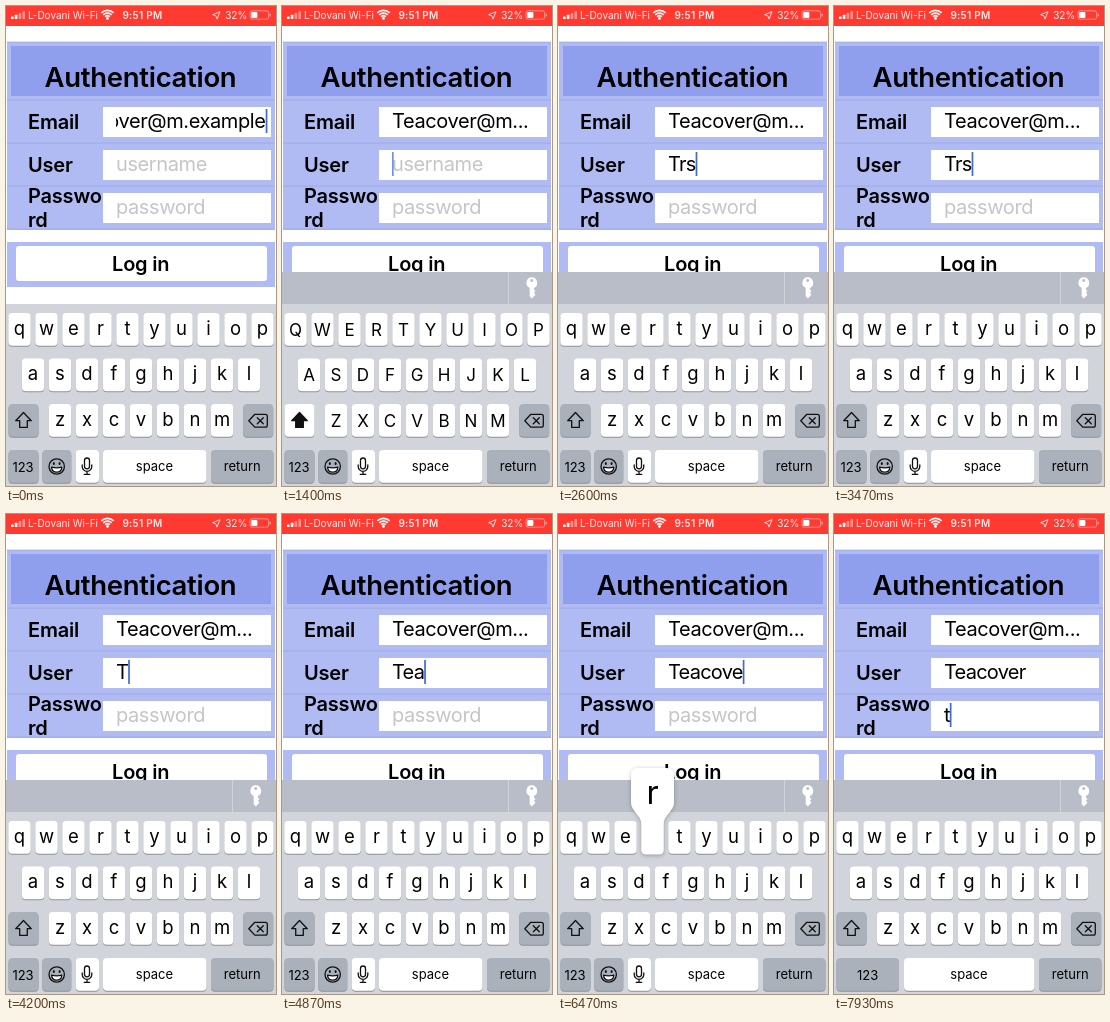
These frames come from a looping animation (270x480 px, 8000 ms). An HTML page:

```html
<!DOCTYPE html>
<html lang="en">
<head>
<meta charset="utf-8">
<title>Login form</title>
<style>
html, body { margin: 0; width: 100%; height: 100%; overflow: hidden; background: #fff; }
svg { display: block; width: 100vw; height: 100vh; font-family: Inter, Roboto, sans-serif; }
.label { font-size: 20px; font-weight: 600; letter-spacing: -.2px; }
.field { font-size: 20px; letter-spacing: -.4px; }
.typed { letter-spacing: -.75px; }
.status { font-size: 10px; fill: #fff; fill-opacity: .9; }
.small { font-size: 13px; text-anchor: middle; }
.mid { text-anchor: middle; }
.line { fill: none; stroke: #111; stroke-width: 1.3; stroke-linejoin: round; stroke-linecap: round; }
</style>
</head>
<body>
<svg id="stage" viewBox="0 0 270 480" preserveAspectRatio="none"></svg>
<script>
const LOOP = 8000;
const NS = 'http://www.w3.org/2000/svg';
const stage = document.getElementById('stage');
const GREY = '#abb1bb';
const EMAIL = 'Teacover@m.example';

function add(tag, attrs, parent = stage, content) {
  const el = document.createElementNS(NS, tag);
  for (const k in attrs) el.setAttribute(k, attrs[k]);
  if (content !== undefined) el.textContent = content;
  parent.appendChild(el);
  return el;
}
const rect = (x, y, width, height, fill, parent, rx = 0) =>
  add('rect', { x, y, width, height, fill, rx }, parent);
const text = (x, y, str, cls, parent, extra = {}) =>
  add('text', { x, y, class: cls, ...extra }, parent, str);
const path = (d, attrs, parent) => add('path', { d, ...attrs }, parent);
const show = (el, on) => el.setAttribute('display', on ? 'inline' : 'none');
const put = (el, str) => { if (el.textContent !== str) el.textContent = str; };

const defs = add('defs', {});
const clip = add('clipPath', { id: 'emailClip' }, defs);
rect(110, 101, 150, 29, '#000', clip);
const blur = add('filter', { id: 'soft', x: '-30%', y: '-30%', width: '160%', height: '160%' }, defs);
add('feDropShadow', { dx: 0, dy: 1, stdDeviation: 2, 'flood-color': '#000', 'flood-opacity': .28 }, blur);

// Status bar
function drawStatus() {
  rect(0, 0, 270, 20, '#ff3a31');
  for (let i = 0; i < 4; i++) {
    const h = 2.5 + i * 1.8;
    add('rect', { x: 5 + i * 3.8, y: 13 - h, width: 2.6, height: h, rx: .6, fill: '#fff', opacity: i < 2 ? 1 : .45 });
  }
  text(22, 12.6, 'L-Dovani Wi-Fi', 'status');
  for (const r of [3.2, 6, 8.8]) {
    const s = r * .7;
    path(`M${101.5 - s} ${13 - s}A${r} ${r} 0 0 1 ${101.5 + s} ${13 - s}`,
      { fill: 'none', stroke: '#fff', 'stroke-width': 1.7 });
  }
  add('circle', { cx: 101.5, cy: 12.4, r: 1.3, fill: '#fff' });
  text(136.5, 12.6, '9:51 PM', 'status mid', stage, { 'font-weight': 600, 'letter-spacing': '.3px' });
  path('M214 5.7l-3 7.4-1.1-3.3-3.3-1.1z', { fill: 'none', stroke: '#fff', 'stroke-width': .8 });
  text(219.2, 12.6, '32%', 'status');
  add('rect', { x: 244, y: 4.8, width: 18.6, height: 8.4, rx: 2, fill: 'none', stroke: '#fff', 'stroke-width': .8, opacity: .55 });
  rect(245.2, 6, 6.2, 6, '#fff', stage, 1);
  add('rect', { x: 263.5, y: 7.5, width: 1.2, height: 3, rx: .6, fill: '#fff', opacity: .55 });
}

// Form
function drawForm() {
  rect(1, 36, 268, 188, '#afbbf2');
  rect(5, 40, 260, 50, '#8f9fee');
  for (const y of [36, 94, 137, 180, 223]) rect(1, y - .3, 268, .7, '#98a3dc');
  text(134.5, 81, 'Authentication', 'mid', stage, { 'font-size': 27.5, 'font-weight': 600, 'letter-spacing': '-.3px' });
  text(22, 122.6, 'Email', 'label');
  text(22, 165.6, 'User', 'label');
  text(22, 196.6, 'Passwo', 'label');
  text(22, 221.4, 'rd', 'label');
  for (const y of [101, 144, 187]) rect(97, y, 168, 30, '#fff');
  rect(1, 236, 268, 45, '#afbbf2');
  rect(10, 240, 251, 35, '#fff', stage, 3);
  text(134.7, 265, 'Log in', 'label mid');
}

drawStatus();
drawForm();
const tail = text(259.5, 121.5, EMAIL, 'field',
  add('g', { 'clip-path': 'url(#emailClip)' }), { 'text-anchor': 'end' });
const cut = text(110, 121.5, EMAIL.slice(0, 10) + '...', 'field');
const user = text(110, 164.5, '', 'field');
const pass = text(110, 207.5, '', 'field');
const caret = rect(0, 0, 1.7, 24, '#3f69d9');

// Keyboard
rect(0, 298, 270, 182, '#d1d4db');
const bar = add('g', {});
rect(0, 266, 270, 32, '#b8bdc7', bar);
rect(226, 266, 1, 32, '#d1d4da', bar);
path('M249.7 271.2a5.6 5.6 0 0 1 2.2 10.7v1.6l1.6 1.6-1.6 1.7 1.6 1.7-3.6 4-2.2-2.2v-8.4a5.6 5.6 0 0 1 2-10.7z'
  + 'M249.7 273a1.5 1.5 0 1 0 .01 0z', { fill: '#fff', 'fill-rule': 'evenodd' }, bar);

function cap(x, y, w, fill = '#fff', parent = stage) {
  rect(x, y + 1, w, 32.8, '#8d9197', parent, 4);
  return rect(x, y, w, 32.8, fill, parent, 4);
}

const rows = [['qwertyuiop', 13.5, 307], ['asdfghjkl', 27, 352.5], ['zxcvbnm', 54, 398]];
const keys = {};
for (const [letters, x0, y] of rows) {
  [...letters].forEach((ch, i) => {
    const x = x0 + 27 * i;
    cap(x - 11.2, y, 22.4);
    keys[ch] = { x, y, glyph: text(x, y, ch, 'mid') };
  });
}

const shiftCap = cap(2.5, 398, 30, GREY);
const shiftIcon = path('M17.5 406.5l7.8 8.2h-4v6.7h-7.6v-6.7h-4z', { class: 'line' });
const delCap = cap(237.2, 398, 30, GREY);
const delIcon = path('M242.8 414.7l6-6.4h10.6q1.9 0 1.9 1.9v9q0 1.9-1.9 1.9h-10.6z', { class: 'line' });
const delCross = path('M251.3 411.7l6 6m0-6l-6 6', { class: 'line' });

const fullRow = add('g', {});
cap(2.5, 444, 30, GREY, fullRow);
text(17, 465.5, '123', 'small', fullRow);
cap(36.3, 444, 29, GREY, fullRow);
add('circle', { cx: 50.7, cy: 460.5, r: 7.7, class: 'line' }, fullRow);
for (const x of [47.8, 53.6]) add('ellipse', { cx: x, cy: 457.6, rx: 1, ry: 1.5, fill: '#111' }, fullRow);
path('M45.6 461.2q5.1 1.4 10.2 0c-.6 6.6-9.6 6.6-10.2 0z', { class: 'line', style: 'fill:#fff' }, fullRow);
cap(69.7, 444, 23.3, '#fff', fullRow);
add('rect', { x: 78.5, y: 452, width: 5, height: 10.8, rx: 2.5, class: 'line' }, fullRow);
path('M76.2 459v1.5a4.8 4.8 0 0 0 9.6 0v-1.5M81 465.4v3m-2.7 0h5.4', { class: 'line' }, fullRow);
cap(97, 444, 103.5, '#fff', fullRow);
text(148.5, 465, 'space', 'small', fullRow);

const passRow = add('g', {});
cap(2.5, 444, 62.5, GREY, passRow);
text(33.7, 465.5, '123', 'small', passRow);
cap(70, 444, 130.5, '#fff', passRow);
text(135, 465, 'space', 'small', passRow);

cap(205, 444, 62.5, GREY);
text(236.3, 465, 'return', 'small');

const popup = add('g', {});
const bubble = path('', { fill: '#fff', filter: 'url(#soft)' }, popup);
const bigGlyph = text(0, 0, '', 'mid', popup, { 'font-size': 32.5 });

// Timeline, in ms
const TO_USER = 870, TO_PASS = 7070;
const presses = [
  [1600, 1730, 't'], [1960, 2100, 'r'], [2210, 2330, 's'],
  [4420, 4560, 'e'], [4700, 4830, 'a'], [4950, 5080, 'c'],
  [5530, 5640, 'o'], [5860, 6000, 'v'], [6250, 6380, 'e'],
  [6440, 6640, 'r'], [7600, 7730, 't']
];
const deletes = [[3600, 3870], [4000, 4200]];
const edits = presses.map(([, up, ch]) => [up, ch])
  .concat(deletes.map(([down]) => [down, '']))
  .sort((a, b) => a[0] - b[0]);
const inside = t => ([a, b]) => t >= a && t < b;

function valueAt(t, from, to) {
  let s = '';
  for (const [at, ch] of edits) {
    if (at < from || at >= to || at > t) continue;
    s = ch ? s + ch : s.slice(0, -1);
  }
  return s;
}

function caretAlpha(since) {
  const d = Math.max(0, since) % 1000;
  if (d < 400) return 1;
  if (d < 550) return (550 - d) / 150;
  if (d < 740) return 0;
  return Math.min(1, (d - 740) / 130);
}

function fill(el, value, hint) {
  put(el, value || hint);
  el.setAttribute('fill', value ? '#000' : '#c5c5ca');
  el.setAttribute('class', value ? 'field typed' : 'field');
  return value ? el.getComputedTextLength() : 0;
}

function drawCaret(t, userWidth, passWidth) {
  let x = 259.7, y = 103, start = 50;
  if (t >= TO_USER) { x = 110 + userWidth; y = 146; start = TO_USER + 90; }
  if (t >= TO_PASS) { x = 110 + passWidth; y = 189; start = TO_PASS + 90; }
  for (const [at] of edits) if (at <= t) start = Math.max(start, at);
  caret.setAttribute('x', x);
  caret.setAttribute('y', y);
  caret.setAttribute('opacity', caretAlpha(t - start));
}

function drawKeys(t, upper) {
  for (const ch in keys) {
    const { y, glyph } = keys[ch];
    put(glyph, upper ? ch.toUpperCase() : ch);
    glyph.setAttribute('font-size', upper ? 17 : 18.5);
    glyph.setAttribute('y', y + (upper ? 22.7 : 21.7));
  }
  shiftCap.setAttribute('fill', upper ? '#fff' : GREY);
  shiftIcon.style.fill = upper ? '#111' : 'none';

  const deleting = deletes.some(inside(t));
  delCap.setAttribute('fill', deleting ? '#fff' : GREY);
  delIcon.style.fill = deleting ? '#111' : 'none';
  delCross.style.stroke = deleting ? '#fff' : '#111';

  const hit = presses.find(inside(t));
  show(popup, hit);
  if (!hit) return;
  const { x, y } = keys[hit[2]];
  bubble.setAttribute('d', `M${x - 14} ${y - 53}h28q7.5 0 7.5 7.5v27c0 9-10.5 12-10.5 22v26q0 4-4 4h-14`
    + 'q-4 0-4-4v-26c0-10-10.5-13-10.5-22v-27q0-7.5 7.5-7.5z');
  put(bigGlyph, upper ? hit[2].toUpperCase() : hit[2]);
  bigGlyph.setAttribute('x', x);
  bigGlyph.setAttribute('y', y - 17);
}

function render(t) {
  const inEmail = t < TO_USER, inPass = t >= TO_PASS;
  show(tail, inEmail);
  show(cut, !inEmail);
  show(bar, !inEmail);
  show(fullRow, !inPass);
  show(passRow, inPass);
  const name = valueAt(t, TO_USER, TO_PASS);
  const userWidth = fill(user, name && name[0].toUpperCase() + name.slice(1), 'username');
  const passWidth = fill(pass, valueAt(t, TO_PASS, LOOP), 'password');
  drawCaret(t, userWidth, passWidth);
  drawKeys(t, !inEmail && !inPass && !name);
}

const begin = performance.now();
function tick() {
  render((performance.now() - begin) % LOOP);
  requestAnimationFrame(tick);
}
tick();
</script>
</body>
</html>
```
